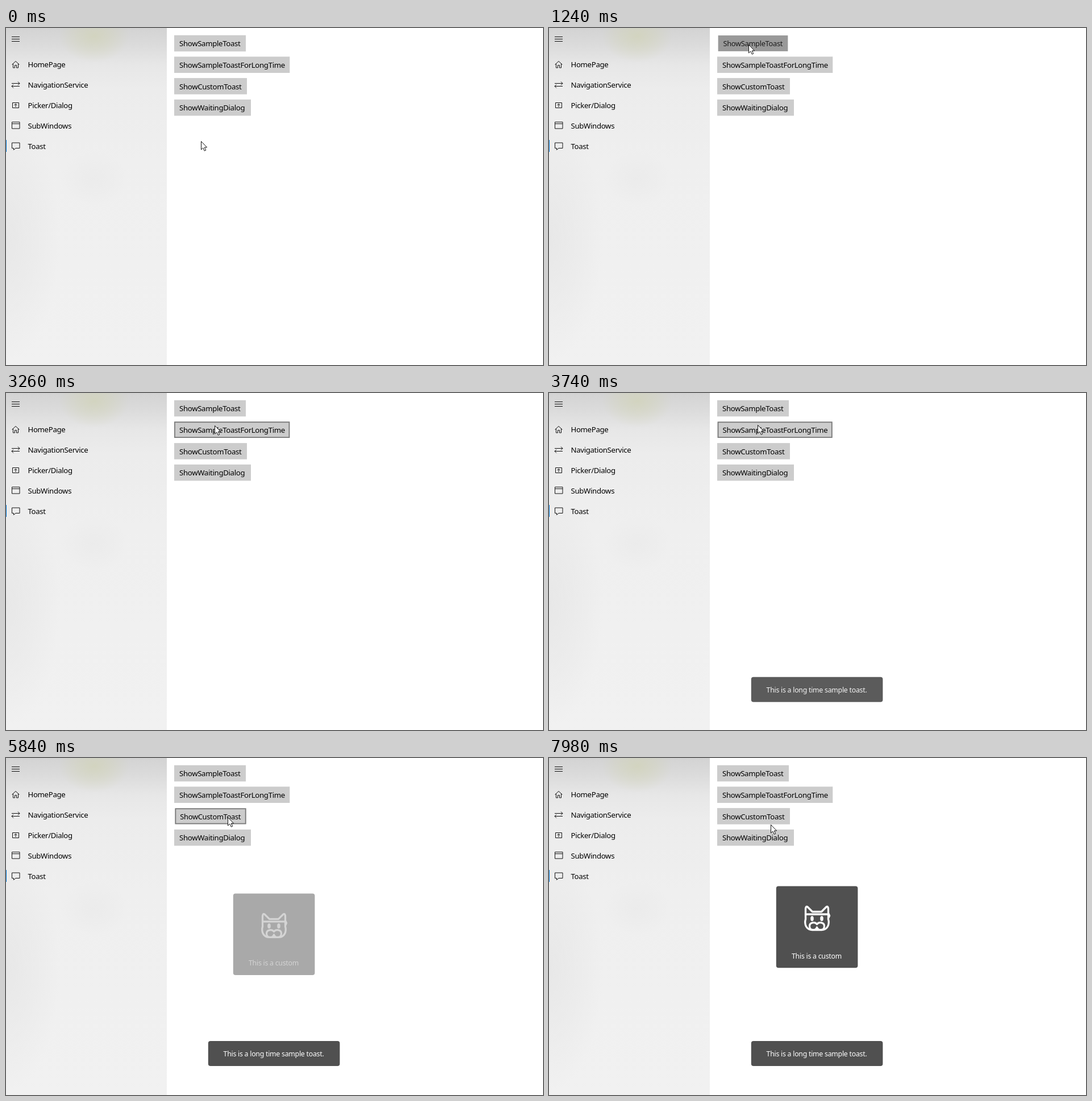
These frames come from a looping animation (945x593 px, 8 s). An HTML page with a canvas:

```html
<!DOCTYPE html>
<html lang="en">
<head>
<meta charset="utf-8">
<title>Toast demo</title>
<style>
html, body { margin: 0; width: 100%; height: 100%; overflow: hidden; background: #fff; }
canvas { display: block; }
</style>
</head>
<body>
<canvas id="stage" width="945" height="593"></canvas>
<script>
const ctx = document.getElementById('stage').getContext('2d');
const LOOP = 8000;
const FONT = '"Noto Sans", "Open Sans", sans-serif';

const buttons = [
  { label: 'ShowSampleToast', x: 296, y: 12.7, w: 126, h: 28.6, down: 1150, up: 1330 },
  { label: 'ShowSampleToastForLongTime', x: 296, y: 50.4, w: 203.3, h: 28.6, down: 3415, up: 3450 },
  { label: 'ShowCustomToast', x: 296, y: 88.1, w: 128, h: 28.6, down: 5690, up: 5752 },
  { label: 'ShowWaitingDialog', x: 296, y: 125.8, w: 135, h: 28.6 }
];

const toasts = [
  { text: 'This is a sample toast.', x: 384, y: 498, w: 175, h: 44, from: 1330, to: 3260, base: 525 },
  { text: 'This is a long time sample toast.', x: 355.8, y: 498, w: 231.6, h: 44, from: 3447, to: LOOP, base: 525 },
  { text: 'This is a custom', x: 399.8, y: 225.6, w: 143.6, h: 143.6, from: 5752, to: LOOP, base: 352.5, cat: true }
];

// time, x, y
const pointerPath = [
  [0, 343.5, 199.5], [140, 343.5, 199.5], [460, 278, 150], [700, 318, 80],
  [920, 350, 30], [1240, 351, 29], [1710, 356.5, 30], [1870, 357, 31],
  [2250, 366, 55], [2400, 367, 57], [3740, 367, 57], [3890, 368, 47],
  [4050, 369, 56], [4200, 371, 62], [4830, 390.5, 104.5], [7180, 390.5, 104.5],
  [7340, 390.5, 110], [7650, 390.5, 110], [7980, 390.5, 117.3], [LOOP, 390.5, 117.3]
];

function pointerAt(t) {
  const i = pointerPath.findIndex(p => p[0] > t);
  const [t0, x0, y0] = pointerPath[i - 1], [t1, x1, y1] = pointerPath[i];
  const p = (t - t0) / (t1 - t0);
  return { x: x0 + (x1 - x0) * p, y: y0 + (y1 - y0) * p };
}

function text(str, x, y, size, color, align = 'left') {
  ctx.font = `${size}px ${FONT}`;
  ctx.letterSpacing = `${size > 13 ? -0.32 : -0.24}px`;
  ctx.textAlign = align;
  ctx.fillStyle = color;
  ctx.fillText(str, x, y);
}

function glow(x, y, r, color, squash = 1) {
  ctx.save();
  ctx.translate(x, y);
  ctx.scale(1, squash);
  const g = ctx.createRadialGradient(0, 0, 0, 0, 0, r);
  g.addColorStop(0, `rgba(${color},0.75)`);
  g.addColorStop(0.5, `rgba(${color},0.4)`);
  g.addColorStop(1, `rgba(${color},0)`);
  ctx.fillStyle = g;
  ctx.fillRect(-r, -r, 2 * r, 2 * r);
  ctx.restore();
}

const menu = [
  ['HomePage', 'M10.5 64.5L17 58.5L23.5 64.5M12.5 63V70H15.5V65.5H18.5V70H21.5V63'],
  ['NavigationService', 'M10 97.5H24M21 94.5L24 97.5L21 100.5M24 102.5H10M13 99.5L10 102.5L13 105.5'],
  ['Picker/Dialog', 'M11.5 131.5H22.5V140.5H11.5ZM17 139V133.5M14.5 136L17 133.5L19.5 136'],
  ['SubWindows', 'M10.5 165.5H24V177H10.5ZM10.5 168.5H24'],
  ['Toast', 'M10.5 202H24V211.5H17L13.5 214.5V211.5H10.5Z']
];

function drawSidebar() {
  ctx.save();
  ctx.beginPath();
  ctx.rect(0, 0, 283, 593);
  ctx.clip();
  const g = ctx.createLinearGradient(0, 0, 0, 593);
  [[0, '#d3d3d3'], [0.05, '#dbdbdb'], [0.11, '#e7e7e7'], [0.18, '#ececec'],
   [0.4, '#efefef'], [1, '#f1f1f1']].forEach(s => g.addColorStop(...s));
  ctx.fillStyle = g;
  ctx.fillRect(0, 0, 283, 593);
  glow(155, 14, 62, '209,211,184', 0.75);
  glow(0, 370, 95, '229,229,229', 2.3);
  glow(155, 265, 60, '234,234,234', 0.8);
  ctx.restore();

  ctx.strokeStyle = '#111';
  ctx.lineWidth = 1;
  ctx.stroke(new Path2D('M10 15.5H24M10 19.5H24M10 23.5H24'));
  menu.forEach(([label, icon], i) => {
    ctx.stroke(new Path2D(icon));
    text(label, 38.5, 69 + 36 * i, 13.2, '#000');
  });
  ctx.fillStyle = '#0078d7';
  ctx.fillRect(0, 197, 1, 21);
}

function drawButton(b, t, mouse) {
  const over = mouse.x >= b.x && mouse.x < b.x + b.w && mouse.y >= b.y && mouse.y < b.y + b.h;
  const pressed = t >= b.down && t < b.up;
  let depth = 0;
  if (pressed) depth = Math.min(1, (t - b.down) / 60);
  else if (t >= b.up) depth = Math.max(0, 1 - ((t - b.up) / 350) ** 1.5);

  ctx.save();
  const cx = b.x + b.w / 2, cy = b.y + b.h / 2, scale = 1 - 0.026 * depth;
  ctx.translate(cx, cy);
  ctx.scale(scale, scale);
  ctx.translate(-cx, -cy);
  ctx.fillStyle = pressed ? '#999' : '#ccc';
  ctx.fillRect(b.x, b.y, b.w, b.h);
  if (over && !pressed) {
    ctx.strokeStyle = '#7a7a7a';
    ctx.lineWidth = 1.8;
    ctx.strokeRect(b.x + 0.9, b.y + 0.9, b.w - 1.8, b.h - 1.8);
  }
  text(b.label, b.x + 9, Math.round(cy + 5.3), 13.2, pressed ? '#1c1c1c' : '#000');
  ctx.restore();
}

const catLines = new Path2D(
  'M451.5 280V267Q451.5 260 455 262L463.5 270.5H479.5L488 262Q491.5 260 491.5 267V280' +
  'M451.5 275H492' +
  'M451.5 279Q452 284 450.8 287C450 297 456 302.5 463 302.5H480C487 302.5 493 297 492.2 287Q491 284 491.5 279' +
  'M491.5 273L493.5 277.5L492 281' +
  'M471.5 292.5C468 288 458.5 289 458.5 296C458.5 300 461.5 302.5 465 302.5Q470 302.5 471.5 298' +
  'Q473 302.5 478 302.5C481.5 302.5 484.5 300 484.5 296C484.5 289 475 288 471.5 292.5');

function drawCat() {
  ctx.strokeStyle = ctx.fillStyle = '#fff';
  ctx.lineWidth = 3.3;
  ctx.lineJoin = ctx.lineCap = 'round';
  ctx.stroke(catLines);
  ctx.beginPath();
  for (const x of [463, 480]) {
    ctx.moveTo(x + 2.8, 282.5);
    ctx.ellipse(x, 282.5, 2.8, 4.5, 0, 0, Math.PI * 2);
  }
  ctx.fill();
}

function drawToast(o, t) {
  if (t < o.from || t >= o.to) return;
  const left = (1 - Math.min(1, (t - o.from) / 700)) ** 5;
  ctx.save();
  ctx.globalAlpha = 1 - left;
  ctx.translate(0, 25.5 * left);
  ctx.fillStyle = 'rgba(0,0,0,0.688)';
  ctx.beginPath();
  ctx.roundRect(o.x, o.y, o.w, o.h, 4);
  ctx.fill();
  if (o.cat) drawCat();
  text(o.text, o.x + o.w / 2 - 0.6, o.base, 12.3, '#fff', 'center');
  ctx.restore();
}

const arrow = new Path2D('M0.5 0.5V15L3.8 11.9L6.3 17.2L8.7 16.1L6.3 11H10.6Z');

function drawPointer({ x, y }) {
  ctx.save();
  ctx.translate(Math.floor(x), Math.floor(y));
  ctx.fillStyle = '#fff';
  ctx.strokeStyle = '#111';
  ctx.lineWidth = 1;
  ctx.fill(arrow);
  ctx.stroke(arrow);
  ctx.restore();
}

function frame(now) {
  const t = now % LOOP, mouse = pointerAt(t);
  ctx.fillStyle = '#fff';
  ctx.fillRect(0, 0, 945, 593);
  drawSidebar();
  buttons.forEach(b => drawButton(b, t, mouse));
  toasts.forEach(o => drawToast(o, t));
  drawPointer(mouse);
}

const start = performance.now();
(function tick() {
  frame(performance.now() - start);
  requestAnimationFrame(tick);
})();
</script>
</body>
</html>
```
